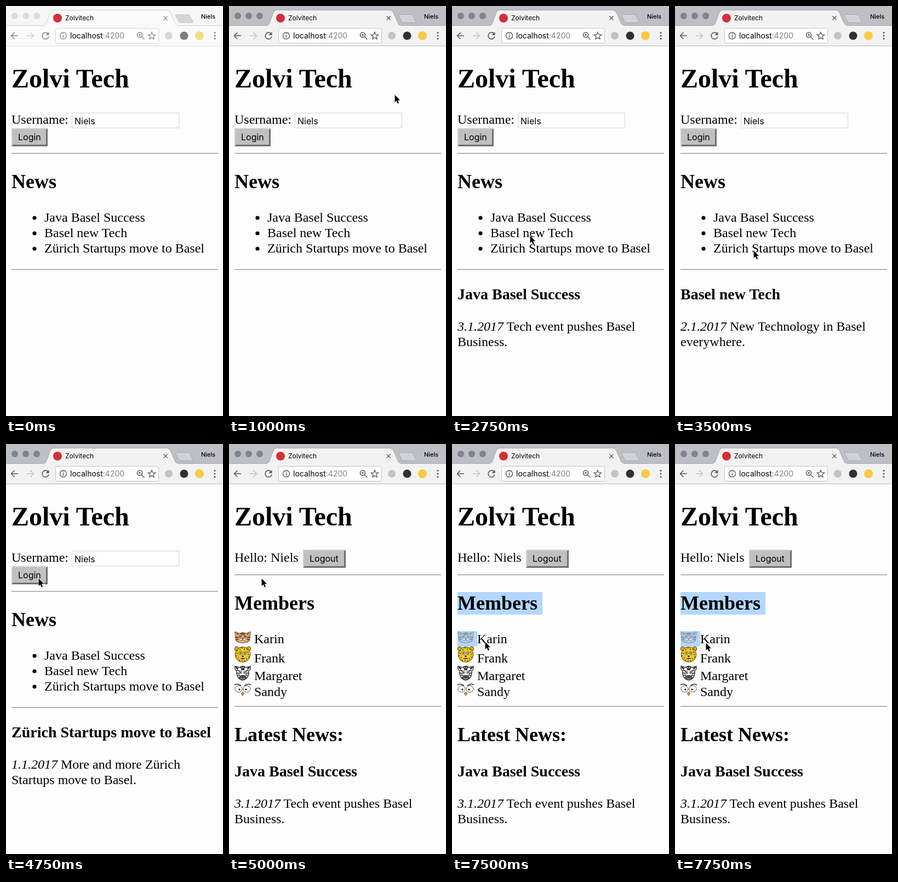
Write an HTML page that moves like this. It is 396x745 px and loops after 8 s.

```html
<!DOCTYPE html>
<html lang="en">
<head>
<meta charset="utf-8">
<title>Zolvitech</title>
<style>
  html, body { margin: 0; width: 100%; height: 100%; overflow: hidden; background: #fdfdfd; }
  svg { display: block; width: 396px; height: 745px; }
  text { font: 24px "Liberation Serif", "Times New Roman", serif; fill: #000; }
  .h1 { font-size: 48px; font-weight: bold; }
  .h2 { font-size: 36px; font-weight: bold; }
  .h3 { font-size: 28px; font-weight: bold; }
  .ui { font: 16px Inter, Roboto, sans-serif; }
  .tab { font-size: 12px; }
  .user { font-size: 11px; font-weight: 500; }
  .url { font-size: 14px; }
  #chrome { --strip: #bcc0c5; --bar: #f2f2f2; --edge: #a4a8ad; --light: #81858a; --icon: #5a5a5a; --faint: #c4c4c4; --add: #cfd2d6; }
  #chrome.idle { --strip: #f6f6f6; --bar: #fafafa; --edge: #cfcfcf; --light: #dcdcdc; --icon: #8b8b8b; --faint: #d2d2d2; --add: #d5d5d5; }
  #chrome.idle .badge { opacity: .62; }
  .icon { fill: none; stroke: var(--icon); stroke-width: 1.6; }
  .selected #cat { filter: grayscale(1) opacity(.5); }
  .mark { display: none; fill: #b3d7ff; }
  .selected .mark { display: inline; }
</style>
</head>
<body>
<svg id="stage" viewBox="0 0 396 745"></svg>
<script>
const LOOP = 8000, STEP = 250;

// time, x, y of the pointer tip
const pointerSteps = [
  [250, 252, 131], [750, 272, 144], [1000, 302, 161], [1250, 164, 388], [1500, 150, 391], [1750, 141, 390],
  [2500, 141, 402], [2750, 142, 417], [3250, 143, 432], [3500, 143, 444],
  [4000, 147, 400], [4250, 143, 308], [4500, 60, 247], [4750, 59, 244],
  [5750, 63, 253], [6000, 82, 295], [6250, 106, 342], [6500, 118, 362], [6750, 120, 365],
  [7000, 104, 360], [7250, 76, 354], [7500, 60, 359], [7750, 56, 361]
];
const pageSteps = [[0, 'none'], [2250, 'java'], [3000, 'tech'], [3750, 'move'], [5000, 'home']];
const ACTIVE_AT = 750, SELECT_AT = 7500;

const text = (x, y, s, cls = '') => `<text x="${x}" y="${y}" class="${cls}">${s}</text>`;
const rect = (x, y, w, h, fill, more = '') => `<rect x="${x}" y="${y}" width="${w}" height="${h}" fill="${fill}" ${more}/>`;
const dot = (x, y, r, fill, more = '') => `<circle cx="${x}" cy="${y}" r="${r}" fill="${fill}" ${more}/>`;
const path = (d, more = 'class="icon"') => `<path d="${d}" ${more}/>`;
const rule = y => rect(10, y, 377, 1, '#959595') + rect(10, y + 1, 377, 1, '#d9d9d9');
const button = (x, y, w, label) =>
  rect(x, y, w, 33, '#c0c0c0') +
  path(`M${x} ${y + 33}l3 -3h${w - 6}v-27l3 -3v33z`, 'fill="#6f6f6f"') +
  path(`M${x} ${y + 33}V${y}h${w}l-2 2h${4 - w}v29z`, 'fill="#cecece"') +
  text(x + 12, y + 22, label, 'ui');

function star(cx, cy, outer, inner) {
  const points = Array.from({ length: 10 }, (_, i) => {
    const a = Math.PI * (i / 5 - .5), r = i % 2 ? inner : outer;
    return `${cx + r * Math.cos(a)},${cy + r * Math.sin(a)}`;
  });
  return `<polygon points="${points.join(' ')}" class="icon" style="stroke-width:1.3"/>`;
}

function chrome() {
  return `<g id="chrome">
    ${rect(0, 0, 396, 36, 'var(--strip)')}
    ${rect(0, 36, 396, 36, 'var(--bar)')}
    ${rect(0, 35, 396, 1, 'var(--edge)')}
    ${rect(0, 72, 396, 1, 'var(--edge)', 'opacity=".8"')}
    ${path('M69 36C73 35 73 32 75 28L81 12Q83 7.5 87 7.5H294Q298 7.5 300 12L307 28C309 33 310 35 314 36', 'fill="var(--bar)" stroke="var(--edge)"')}
    ${rect(70, 35, 243, 2, 'var(--bar)')}
    ${path('M311 15.5H332Q335 15.5 336 18L341 28Q342 30.5 339 30.5H319Q316 30.5 315 28L309.5 18Q309 15.5 311 15.5Z', 'fill="var(--add)" stroke="var(--edge)"')}
    ${[16, 36, 56].map(x => dot(x, 18, 6, 'var(--light)')).join('')}
    ${dot(94, 22, 8, '#d32f36')}
    ${text(108, 26, 'Zolvitech', 'ui tab')}
    ${path('M287.5 18.5l7 7m0 -7l-7 7', 'class="icon" style="stroke-width:1.3"')}
    ${text(356, 23, 'Niels', 'ui user')}
    ${path('M22 54H10M15.5 48L9.5 54L15.5 60')}
    ${path('M38 54H50M44.5 48L50.5 54L44.5 60', 'class="icon" style="stroke:var(--faint)"')}
    ${path('M76.5 50A6 6 0 1 0 78 55.5')}
    ${path('M78.5 47v6h-6z', 'fill="var(--icon)"')}
    ${rect(90.5, 40.5, 188, 27, '#fff', 'rx="3" stroke="var(--faint)"')}
    ${dot(104.5, 54, 6, 'none', 'class="icon" style="stroke-width:1.4"')}
    ${path('M104.5 53v4.5M104.5 50v1.5')}
    <text x="117" y="59" class="ui url">localhost<tspan fill="#808080">:4200</tspan></text>
    ${dot(244, 52.5, 4.5, 'none', 'class="icon"')}
    ${path('M247.5 56l5 5M242 52.5h4M244 50.5v4', 'class="icon" style="stroke-width:1.3"')}
    ${star(266, 54.5, 7, 3.1)}
    <g class="badge">${dot(297, 54, 7, '#c3c3c3')}${dot(325, 54, 7.5, '#303030')}${dot(353, 54, 8, '#f6cb42')}</g>
    ${[48.5, 54, 59.5].map(y => dot(381, y, 1.6, 'var(--icon)')).join('')}
  </g>`;
}

const articles = {
  java: ['Java Basel Success', '3.1.2017', 'Tech event pushes Basel', 'Business.'],
  tech: ['Basel new Tech', '2.1.2017', 'New Technology in Basel', 'everywhere.'],
  move: ['Zürich Startups move to Basel', '1.1.2017', 'More and more Zürich', 'Startups move to Basel.']
};
function article(id, y) {
  const [title, date, first, second] = articles[id];
  return text(10, y, title, 'h3') +
    text(10, y + 57, `<tspan font-style="italic">${date}</tspan> ${first}`) +
    text(10, y + 85, second);
}

function loginPage() {
  const news = ['java', 'tech', 'move'].map((id, i) =>
    dot(52, 385 + 28 * i, 3.6, '#000') + text(70, 392 + 28 * i, articles[id][0])).join('');
  return `<g id="login">
    ${text(10, 214, 'Username:')}
    ${rect(120.5, 194.5, 195, 27, '#fff', 'stroke="#d2d2d2"')}
    ${text(125, 215, 'Niels', 'ui')}
    ${button(10, 222, 66, 'Login')}
    ${rule(267)}${text(10, 331, 'News', 'h2')}${news}${rule(478)}
    ${Object.keys(articles).map(id => `<g data-article="${id}">${article(id, 533)}</g>`).join('')}
  </g>`;
}

const line = (color, width) => `fill="none" stroke="${color}" stroke-width="${width}"`;
const eyes = (y, gap, r) => [25 - gap, 25 + gap].map(x =>
  dot(x, y, r, '#fff', 'stroke="#333" stroke-width=".8"') + dot(x, y, 1.2, '#111')).join('');

function cat() {
  return `<g id="cat">
    ${path('M11 341L18 344Q25 342 32 344L39 341Q40 346 37 350Q40 357 34 360Q25 363 16 360Q10 357 13 350Q10 346 11 341Z', 'fill="#e3a06b" stroke="#70452b"')}
    ${path('M22 343l1 4M25 342v5M28 343l-1 4M11 351l6 1M12 356l5 -1M39 351l-6 1M38 356l-5 -1M14 344l3 2M36 344l-3 2', line('#332014', 1.4))}
    ${eyes(350, 4.5, 2.3)}
    <ellipse cx="25" cy="356.5" rx="6" ry="3.5" fill="#f3d3b0"/>
    ${path('M23.5 353.5h3l-1.5 2zM20 357q2.5 2 5 -1q2.5 3 5 1', 'fill="#a33b2d" stroke="#5a2b1c" stroke-width=".8"')}
  </g>`;
}
function leopard() {
  const spots = Array.from({ length: 15 }, (_, i) => {
    const a = i * 2 * Math.PI / 15, r = 10.3 + (i % 2) * 1.8;
    return dot(25 + r * Math.cos(a), 382.5 + r * Math.sin(a), 1.1, '#4b3908');
  }).join('');
  return [14, 36].map(x => dot(x, 372, 3.7, '#dfb41d', 'stroke="#4b3908"')).join('') +
    dot(25, 382.5, 13.8, '#efc51f', 'stroke="#4b3908"') + spots + eyes(380, 4, 2.8) +
    '<ellipse cx="25" cy="388" rx="6" ry="4.2" fill="#f3d44f"/>' +
    path('M23 385h4l-2 2.5zM20.5 389q4.5 3 9 0', 'fill="#33240a" stroke="#33240a" stroke-width=".8"');
}
function zebra() {
  return path('M11 404L19 406Q25 402 31 406L39 404Q40 410 36 412Q37 420 32 426Q25 432 18 426Q13 420 14 412Q10 410 11 404Z', 'fill="#fff" stroke="#222" stroke-width="1.3"') +
    path('M12.5 405.5l4 3.5M37.5 405.5l-4 3.5', line('#222', 2.5)) +
    path('M25 403v8M21.5 405l2 6M28.5 405l-2 6M15 411l5 2M35 411l-5 2M14 416l5 1M36 416l-5 1M16 420l4 0M34 420l-4 0', line('#151515', 1.7)) +
    eyes(415, 4, 2.6) +
    '<ellipse cx="25" cy="424" rx="7" ry="4.3" fill="#444"/>' +
    path('M22 423v1M28 423v1M21 426q4 2 8 0', line('#ddd', .9));
}
function owl() {
  return [17.5, 32.5].map(x =>
    `<ellipse cx="${x}" cy="445" rx="6.5" ry="6" fill="#fff" stroke="#555"/>` + dot(x + (25 - x) * .2, 446, 1.6, '#111')).join('') +
    path('M10 438Q14 434 22 439M40 438Q36 434 28 439', line('#333', 1.6)) +
    path('M25 450l2.8 3l-2.8 4.5l-2.8 -4.5z', 'fill="#e07f3a" stroke="#8a4a20" stroke-width=".7"');
}

function homePage() {
  const members = [['Karin', 362], ['Frank', 397], ['Margaret', 429], ['Sandy', 458]];
  return `<g id="home">
    <g class="mark">${rect(10, 269, 155, 41, '#b3d7ff')}${rect(10, 340, 36, 28, '#b3d7ff')}</g>
    ${text(10, 214, 'Hello: Niels')}${button(135, 192, 78, 'Logout')}
    ${rule(237)}${text(10, 301, 'Members', 'h2')}
    ${cat()}${leopard()}${zebra()}${owl()}
    ${members.map(([name, y]) => text(46, y, name)).join('')}
    ${rule(476)}${text(10, 540, 'Latest News:', 'h2')}${article('java', 604)}
  </g>`;
}

const $ = id => document.getElementById(id);
$('stage').innerHTML = rect(0, 0, 396, 745, '#fdfdfd') + chrome() +
  text(10, 148, 'Zolvi Tech', 'h1') + loginPage() + homePage() +
  path('M.6 .6V14L3.7 11.2L5.8 16.2L8.1 15.2L6 10.3H10.2Z', 'id="pointer" fill="#000" stroke="#fff" stroke-width="1.3" paint-order="stroke"');

const show = (el, on) => { el.style.display = on ? '' : 'none'; };
const latest = (steps, t) => steps.filter(s => s[0] <= t).pop();

function draw(t) {
  const page = latest(pageSteps, t)[1], tip = latest(pointerSteps, t);
  $('chrome').classList.toggle('idle', t < ACTIVE_AT);
  show($('login'), page !== 'home');
  show($('home'), page === 'home');
  document.querySelectorAll('[data-article]').forEach(el => show(el, el.dataset.article === page));
  $('home').classList.toggle('selected', t >= SELECT_AT);
  show($('pointer'), tip);
  if (tip) $('pointer').setAttribute('transform', `translate(${tip[1]} ${tip[2]})`);
}

const start = performance.now();
let shown = -1;
function tick() {
  const t = Math.floor((performance.now() - start) % LOOP / STEP) * STEP;
  if (t !== shown) draw(shown = t);
  requestAnimationFrame(tick);
}
tick();
</script>
</body>
</html>
```
